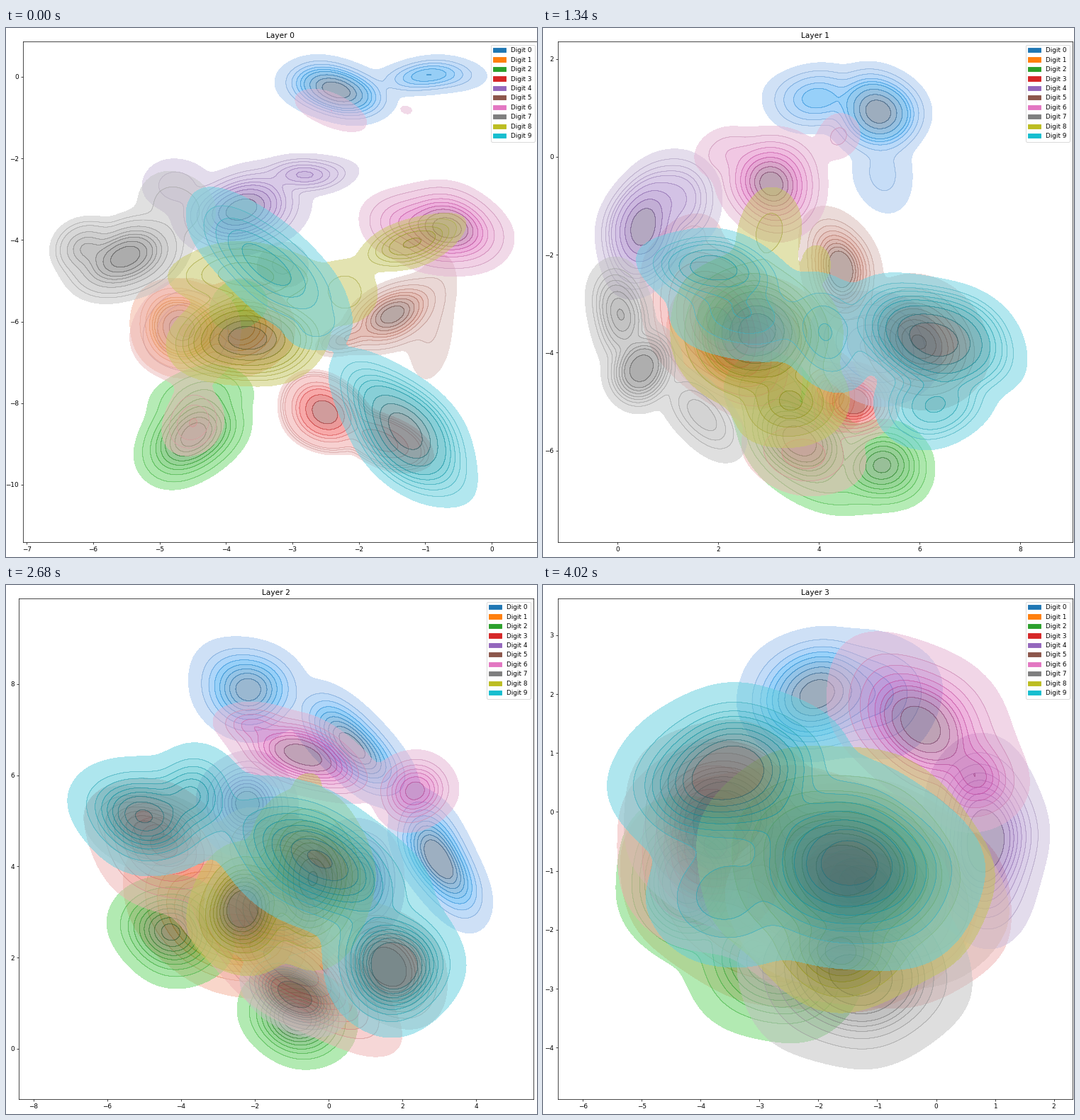
A matplotlib script for the animation above (4820 ms loop, 749 by 747 pixels).

```python
import numpy as np
import matplotlib.pyplot as plt
from matplotlib.animation import FuncAnimation
from matplotlib.colors import to_rgb
from matplotlib.patches import Patch

W, H, DPI = 749, 747, 64
TOP, BOTTOM, AX_W = 19.2, 726.2, 725.7
HOLD, STEP, STEPS = 800, 60, 10      # ms still, ms per blend step, steps per blend
TICK = 20
BANDS, FLOOR = 9, 0.05               # colour bands per class, density at the outer edge
COLORS = [to_rgb(f"C{i}") for i in range(10)]
XYZ_RGB = np.array([[3.2410, -1.5374, -0.4986],
                    [-0.9692, 1.8760, 0.0416],
                    [0.0556, -0.2040, 1.0570]])
WHITE_U, WHITE_V = 0.19783, 0.46832


# --- colour ramps of constant hue, light to dark, in CIELUV ---

def luv_linear(light, chroma, hue):
    u = chroma * np.cos(hue) / (13 * light) + WHITE_U
    v = chroma * np.sin(hue) / (13 * light) + WHITE_V
    y = ((light + 16) / 116) ** 3
    return XYZ_RGB @ [9 * y * u / (4 * v), y, y * (12 - 3 * u - 20 * v) / (4 * v)]


def max_chroma(light, hue):
    lo, hi = 0.0, 200.0
    for _ in range(20):
        mid = (lo + hi) / 2
        rgb = luv_linear(light, mid, hue)
        if rgb.min() >= 0 and rgb.max() <= 1:
            lo = mid
        else:
            hi = mid
    return lo


def hue_and_sat(color):
    c = np.array(color)
    lin = np.where(c <= 0.04045, c / 12.92, ((c + 0.055) / 1.055) ** 2.4)
    x, y, z = np.linalg.solve(XYZ_RGB, lin)
    light = 116 * y ** (1 / 3) - 16
    d = x + 15 * y + 3 * z
    u = 13 * light * (4 * x / d - WHITE_U)
    v = 13 * light * (9 * y / d - WHITE_V)
    hue = np.arctan2(v, u)
    return hue, min(1, np.hypot(u, v) / max_chroma(light, hue))


def shade(hue, sat, t):
    light = 80 - 45 * t
    chroma = sat * np.cos(0.74 - 1.74 * t) * max_chroma(light, hue)
    lin = np.clip(luv_linear(light, chroma, hue), 0, 1)
    rgb = np.where(lin <= 0.0031308, 12.92 * lin, 1.055 * lin ** (1 / 2.4) - 0.055)
    return np.clip(rgb, 0, 1)


TONES = [hue_and_sat(c) for c in COLORS]


# --- densities: sums of bells, cut into bands of equal mass ---

GX, GY = np.meshgrid(np.arange(0, W + 2, 3.0), np.arange(0, H + 2, 3.0))


def bell(gx, gy, x, y, rx, ry, turn=0, height=1):
    """Gaussian that falls to the outer edge's density at radii rx and ry."""
    a = np.radians(turn)
    dx, dy = gx - x, gy - y
    u = (dx * np.cos(a) + dy * np.sin(a)) / rx
    v = (dy * np.cos(a) - dx * np.sin(a)) / ry
    return height * (FLOOR / height) ** (u * u + v * v)


def blob(ax, digit, *bells):
    # a slight wave keeps the contours from being perfect ellipses
    gx = GX + 3 * np.sin(GY / 26 + digit)
    gy = GY + 3 * np.sin(GX / 30 + 2 * digit)
    z = np.sqrt(sum(bell(gx, gy, *b) ** 2 for b in bells))
    dense = np.sort(z[z > FLOOR])
    mass = np.cumsum(dense) / dense.sum()
    inner = np.interp(np.arange(1, BANDS) / BANDS, mass, dense)
    levels = np.array([FLOOR, *inner, z.max() + 1e-6])
    mids = (levels[1:] + levels[:-1]) / 2
    tones = np.array([shade(*TONES[digit], t)
                      for t in (mids - FLOOR) / (levels[-1] - FLOOR)])
    order = 2 + digit * 0.1
    ax.contourf(GX, GY, z, levels, colors=tones, alpha=0.5, zorder=order)
    ax.contour(GX, GY, z, inner, colors=tones[1:] * 0.65, linewidths=0.5,
               alpha=0.5, zorder=order + 0.05)


# each bell: x, y, two radii, turn in degrees, height

def layer_0(ax):
    blob(ax, 0, (465, 88, 86, 47, 8), (598, 69, 82, 28, -3, .45))
    blob(ax, 1, (245, 422, 73, 70), (330, 425, 75, 70, 0, .5), (460, 441, 20, 10, 10, .12))
    blob(ax, 2, (262, 575, 88, 68, -35), (275, 522, 75, 42, -10, .3),
         (325, 393, 43, 33, -30, .12))
    blob(ax, 3, (447, 545, 70, 56, 30), (530, 580, 82, 36, 25, .4),
         (262, 560, 42, 48, 25, .12), (255, 430, 78, 74, 0, .12))
    blob(ax, 4, (335, 257, 100, 65, -10), (420, 207, 76, 30, -5, .5), (240, 222, 48, 38, 0, .2))
    blob(ax, 5, (548, 405, 85, 46, -32), (484, 440, 50, 22, -15, .4), (600, 405, 34, 88, 8, .12))
    blob(ax, 6, (620, 285, 95, 67, 12), (560, 272, 64, 48, 0, .4),
         (456, 118, 52, 24, 20, .12), (562, 114, 8, 5, 20, .12))
    blob(ax, 7, (170, 325, 92, 62, -15), (112, 308, 50, 45, 0, .5), (238, 255, 55, 52, -10, .15),
         (393, 337, 36, 32, 0, .12))
    blob(ax, 8, (340, 440, 114, 68), (340, 350, 110, 46, 0, .25), (478, 375, 44, 46, 40, .12),
         (575, 302, 78, 34, -22, .4))
    blob(ax, 9, (562, 567, 138, 70, 48), (368, 332, 142, 62, 42, .35), (440, 425, 40, 30, 0, .12))


def layer_1(ax):
    blob(ax, 0, (470, 118, 76, 70), (385, 100, 78, 50, 0, .4), (482, 205, 42, 55, 0, .14))
    blob(ax, 1, (290, 440, 120, 95, 15), (405, 515, 52, 58, 0, .5))
    blob(ax, 2, (360, 582, 96, 68, 30), (480, 620, 76, 64, 15, .7), (320, 515, 64, 55, 0, .2),
         (400, 640, 90, 42, 15, .2), (270, 405, 55, 40, 0, .12))
    blob(ax, 3, (435, 530, 65, 56), (250, 420, 150, 95, 55, .8), (370, 600, 90, 58, 15, .2),
         (215, 290, 35, 25, 0, .12))
    blob(ax, 4, (143, 282, 66, 102, 15), (190, 245, 65, 70, 0, .4), (470, 450, 95, 80, 20, .3))
    blob(ax, 5, (418, 338, 56, 92, -18), (530, 445, 100, 95, 25, .8))
    blob(ax, 6, (325, 218, 80, 82), (265, 180, 50, 38, 0, .2), (415, 155, 30, 32, 0, .14))
    blob(ax, 7, (140, 480, 56, 64), (108, 402, 48, 82, -5, .6), (225, 548, 75, 46, 50, .3))
    blob(ax, 8, (300, 430, 125, 110, 25), (350, 530, 85, 62, -20, .4),
         (320, 290, 45, 62, 0, .15), (390, 330, 18, 24, 0, .12))
    blob(ax, 9, (553, 437, 138, 84, 20), (240, 340, 108, 55, 8, .4), (280, 405, 105, 65, 10, .2),
         (400, 430, 58, 90, -22, .2), (550, 530, 86, 62, -10, .35))


def layer_2(ax):
    blob(ax, 0, (340, 145, 88, 72, 25, .8), (490, 225, 112, 55, 45, .9), (612, 390, 112, 55, 62))
    blob(ax, 1, (310, 470, 160, 100, 30))
    blob(ax, 2, (235, 488, 92, 78, 25, .9), (412, 610, 90, 68, 25))
    blob(ax, 3, (400, 540, 190, 70, 35), (220, 370, 120, 85, 35, .6))
    blob(ax, 4, (340, 310, 72, 75), (500, 410, 62, 85, -20, .9))
    blob(ax, 5, (540, 540, 95, 75, 45), (200, 345, 95, 58, 15, .6), (405, 400, 120, 70, 30, .7))
    blob(ax, 6, (420, 242, 115, 56, 22), (574, 290, 62, 58, 0, .65), (350, 195, 55, 32, 5, .35))
    blob(ax, 7, (405, 580, 80, 52, 25), (380, 460, 105, 78, 20, .6))
    blob(ax, 8, (335, 460, 78, 94), (430, 412, 88, 130, -5, .8), (425, 278, 16, 14, 0, .12))
    blob(ax, 9, (545, 535, 102, 100, 45), (195, 325, 108, 82, 20, .75),
         (265, 300, 75, 74, 20, .5), (440, 390, 185, 95, 30, .75))


def layer_3(ax):
    blob(ax, 0, (385, 155, 112, 95), (470, 155, 92, 90, 0, .35))
    blob(ax, 1, (360, 430, 255, 170, 10))
    blob(ax, 2, (205, 415, 104, 120), (320, 540, 130, 104, 20, .7))
    blob(ax, 3, (240, 370, 138, 150, 0, .9), (440, 440, 225, 155, 10))
    blob(ax, 4, (622, 360, 90, 152), (410, 440, 150, 130, 0, .7))
    blob(ax, 5, (250, 330, 138, 140), (430, 420, 230, 150, 15, .7))
    blob(ax, 6, (535, 195, 155, 105, 40), (610, 275, 72, 76, 0, .6))
    blob(ax, 7, (440, 550, 165, 132), (450, 420, 120, 90, 0, .5))
    blob(ax, 8, (425, 400, 212, 172, 15), (420, 520, 110, 80, 0, .7))
    blob(ax, 9, (262, 268, 170, 126, -10), (430, 395, 195, 148, 15, .75),
         (255, 440, 110, 100, 30, .3))


# draw, left edge, then zero position, pixels per unit and values of each axis
LAYERS = [
    (layer_0, 24.3, (685, 93.7, range(-7, 1)), (69, 57.6, range(-10, 1, 2))),
    (layer_1, 21.3, (105, 71, range(0, 9, 2)), (182, 69.1, range(-6, 3, 2))),
    (layer_2, 18.3, (455, 52, range(-8, 5, 2)), (655, 64.4, range(0, 9, 2))),
    (layer_3, 21.3, (554.5, 83.05, range(-6, 3)), (320.5, 83.2, range(-4, 4))),
]


def label(v):
    return f"\N{MINUS SIGN}{-v}" if v < 0 else str(v)


def render(fig, number):
    draw, left, (x0, ux, xs), (y0, uy, ys) = LAYERS[number]
    fig.clf()
    ax = fig.add_axes([left / W, 1 - BOTTOM / H, AX_W / W, (BOTTOM - TOP) / H])
    draw(ax)
    ax.set_xlim(left, left + AX_W)
    ax.set_ylim(BOTTOM, TOP)
    ax.set_xticks([x0 + ux * v for v in xs], [label(v) for v in xs])
    ax.set_yticks([y0 - uy * v for v in ys], [label(v) for v in ys])
    ax.set_title(f"Layer {number}")
    keys = [Patch(color=c, label=f"Digit {i}") for i, c in enumerate(COLORS)]
    ax.legend(handles=keys, loc="upper right").set_zorder(5)
    fig.canvas.draw()
    return np.array(fig.canvas.buffer_rgba())[..., :3].astype(float)


fig = plt.figure(figsize=(W / DPI, H / DPI), dpi=DPI, facecolor="white")
pages = [render(fig, i) for i in range(len(LAYERS))]
fig.clf()
view = fig.figimage(pages[0].astype(np.uint8), origin="upper")

CYCLE = HOLD + STEP * (STEPS - 1)


def update(frame):
    page, t = divmod(frame * TICK, CYCLE)
    img = pages[page]
    if t >= HOLD:
        mix = ((t - HOLD) // STEP + 1) / STEPS
        img = img * (1 - mix) + pages[page + 1] * mix
    view.set_data(np.round(img).astype(np.uint8))
    return [view]


FRAMES = (CYCLE * (len(LAYERS) - 1) + HOLD) // TICK
anim = FuncAnimation(fig, update, frames=FRAMES, interval=TICK,
                     repeat=True, repeat_delay=0, blit=False)
plt.show()
```
